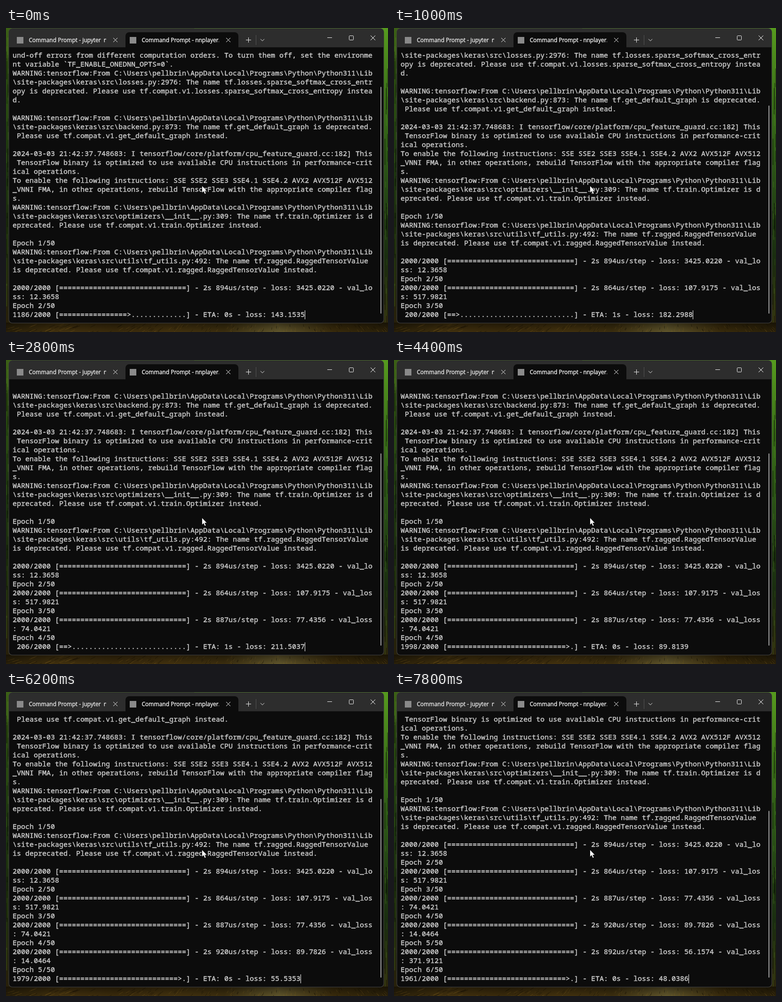
Recreate the animation shown at these times as an HTML page with a canvas. Size 812 by 646 pixels, loop 8000 ms.

```html
<!DOCTYPE html>
<html lang="en">
<head>
<meta charset="utf-8">
<title>Training log</title>
<style>
html, body { margin: 0; width: 100%; height: 100%; overflow: hidden; background: #0c0c0c; }
canvas { display: block; width: 812px; height: 646px; }
</style>
</head>
<body>
<canvas id="stage" width="812" height="646"></canvas>
<script>
const W = 812, H = 646, LOOP = 8000, TICK = 200;
const COLS = 85, ROWS = 30, CELL_W = 9, CELL_H = 19, LEFT = 14, BASE = 63;
const MONO = '15px "Noto Sans Mono", "DejaVu Sans Mono", monospace';
const UI = '12px "Open Sans", "Noto Sans", sans-serif';
const ctx = document.getElementById("stage").getContext("2d");

const SRC = String.raw`C:\Users\pellbrin\AppData\Local\Programs\Python\Python311\Lib\site-packages\keras\src`;
const warn = (file, name, instead) =>
  `WARNING:tensorflow:From ${SRC}\\${file}: The name ${name} is deprecated. Please use ${instead} instead.`;

const INTRO = [
  "und-off errors from different computation orders. To turn them off, set the environment variable `TF_ENABLE_ONEDNN_OPTS=0`.",
  warn("losses.py:2976", "tf.losses.sparse_softmax_cross_entropy", "tf.compat.v1.losses.sparse_softmax_cross_entropy"),
  "",
  warn("backend.py:873", "tf.get_default_graph", "tf.compat.v1.get_default_graph"),
  "",
  "2024-03-03 21:42:37.748683: I tensorflow/core/platform/cpu_feature_guard.cc:182] This TensorFlow binary is optimized to use available CPU instructions in performance-critical operations.",
  "To enable the following instructions: SSE SSE2 SSE3 SSE4.1 SSE4.2 AVX2 AVX512F AVX512_VNNI FMA, in other operations, rebuild TensorFlow with the appropriate compiler flags.",
  warn("optimizers\\__init__.py:309", "tf.train.Optimizer", "tf.compat.v1.train.Optimizer"),
  "",
  "Epoch 1/50",
  warn("utils\\tf_utils.py:492", "tf.ragged.RaggedTensorValue", "tf.compat.v1.ragged.RaggedTensorValue"),
  ""
];

// Finished epochs: microseconds per step, loss, validation loss
const DONE = [
  [894, "3425.0220", "12.3658"],
  [864, "107.9175", "517.9821"],
  [887, "77.4356", "74.0421"],
  [920, "89.7826", "14.0464"],
  [892, "56.1574", "371.9121"]
];

// Running loss per epoch, from the second on: step, loss, later step, loss
const LOSS = [
  [1186, 143.1535, 2000, 107.9175],
  [200, 182.2988, 1960, 77.9607],
  [206, 211.5037, 1998, 89.8139],
  [218, 88.2417, 1979, 55.5353],
  [227, 71.6052, 1961, 48.0386]
];

// Time and total steps since the first epoch ended
const PACE = [[0, 1186], [1000, 2200], [2600, 3960], [2800, 4206], [4400, 5998], [6200, 7979], [7800, 9961]];

function stepsAt(t) {
  let i = 1;
  while (i < PACE.length - 1 && t > PACE[i][0]) i++;
  const [t0, n0] = PACE[i - 1], [t1, n1] = PACE[i];
  return Math.round(n0 + (n1 - n0) * (t - t0) / (t1 - t0));
}

// A running mean settles like a + b / n
function lossAt(k, n) {
  const [n0, l0, n1, l1] = LOSS[k];
  const b = (l0 - l1) / (1 / n0 - 1 / n1);
  return (l1 + b * (1 / n - 1 / n1)).toFixed(4);
}

function bar(n) {
  const w = Math.floor(30 * n / 2000);
  const head = w ? "=".repeat(w - 1) + (n < 2000 ? ">" : "=") : "";
  return `${String(n).padStart(4)}/2000 [${head}${".".repeat(30 - w)}]`;
}

function wrap(line) {
  const rows = [];
  for (let i = 0; i === 0 || i < line.length; i += COLS) rows.push(line.slice(i, i + COLS));
  return rows;
}

function logAt(t) {
  const total = stepsAt(t), k = Math.floor(total / 2000), n = total % 2000;
  const lines = [...INTRO];
  for (let e = 0; e <= k; e++) {
    const [us, loss, val] = DONE[e];
    lines.push(`${bar(2000)} - 2s ${us}us/step - loss: ${loss} - val_loss: ${val}`, `Epoch ${e + 2}/50`);
  }
  const eta = Math.floor((2000 - n) * 0.0009);
  lines.push(`${bar(n)} - ETA: ${eta}s - loss: ${lossAt(k, n)}`);
  return lines.flatMap(wrap);
}

function rand(seed) {
  return () => (seed = (seed * 16807) % 2147483647) / 2147483647;
}

function gradient(x0, y0, x1, y1, colors) {
  const g = ctx.createLinearGradient(x0, y0, x1, y1);
  colors.forEach((c, i) => g.addColorStop(i / (colors.length - 1), c));
  return g;
}

function fill(color, x, y, w, h) {
  ctx.fillStyle = color;
  ctx.fillRect(x, y, w, h);
}

function box(color, x, y, w, h, r) {
  ctx.fillStyle = color;
  ctx.beginPath();
  ctx.roundRect(x, y, w, h, r);
  ctx.fill();
}

function stroke(color, ...paths) {
  ctx.strokeStyle = color;
  ctx.lineWidth = 1;
  ctx.beginPath();
  for (const [start, ...rest] of paths) {
    ctx.moveTo(...start);
    rest.forEach(p => ctx.lineTo(...p));
  }
  ctx.stroke();
}

function cross(x, y, r, color) {
  stroke(color, [[x - r, y - r], [x + r, y + r]], [[x - r, y + r], [x + r, y - r]]);
}

// Text with a thin outline, for slightly heavier stems
function write(text, x, y, font, color, weight) {
  ctx.font = font;
  ctx.fillStyle = ctx.strokeStyle = color;
  ctx.lineWidth = weight;
  ctx.lineJoin = "round";
  ctx.fillText(text, x, y);
  ctx.strokeText(text, x, y);
}

function drawForest() {
  const r = rand(71);
  fill(gradient(0, 0, 0, H, ["#3c6016", "#22400f", "#1d3410", "#1b260c", "#2a200a"]), 0, 0, 400, H);
  fill(gradient(0, 0, 0, H, ["#569a1e", "#3a7018", "#284e16", "#1a2e10", "#2e250c"]), 400, 0, 412, H);
  for (let i = 0; i < 60; i++) {
    const x = i % 2 ? r() * 6 : 803 + r() * 9;
    fill(r() < 0.55 ? "rgba(8,16,4,.4)" : "rgba(100,150,45,.2)", x, r() * 600, 1 + r() * 2, 10 + r() * 50);
  }
  fill(gradient(0, 0, W, 0, ["#2c220a", "#46340f", "#3c2c0c", "#46340f", "#3e300f", "#655a2e", "#3c2d0c", "#2c220a"]), 0, 626, W, 20);
  for (let i = 0; i < 170; i++) {
    const x = r() * W, y = 628 + r() * 18;
    const lean = (x - 590) / 40;
    stroke(r() < 0.5 ? "rgba(18,12,2,.5)" : "rgba(150,112,36,.35)", [[x, y], [x + lean, y + 5]]);
  }
  fill(gradient(0, 626, 0, H, ["rgba(0,0,0,.45)", "rgba(0,0,0,.05)"]), 0, 626, W, 20);
}

function drawTab(x, title, color) {
  box("#8a8a8a", x, 19, 14, 14, 0);
  ctx.save();
  ctx.beginPath();
  ctx.rect(x + 25, 12, 165, 26);
  ctx.clip();
  write(title, x + 25.5, 30, UI, color, 0.3);
  ctx.restore();
  cross(x + 209.5, 25.5, 4.5, color);
}

function drawWindow() {
  box("#444", 5.5, 0.5, 798, 627, 8);
  box("#0c0c0c", 6.5, 1.5, 796, 625, 7);
  box("#2d2d2d", 6.5, 1.5, 796, 39.5, [7, 7, 0, 0]);
  box("#0c0c0c", 254, 9, 240, 33, [8, 8, 0, 0]);
  drawTab(23, "Command Prompt - jupyter  notebook", "#f0f0f0");
  drawTab(263, "Command Prompt - nnplayer.", "#fff");
  stroke("#eee", [[510, 25.5], [521, 25.5]], [[515.5, 20], [515.5, 31]]);
  stroke("#555", [[531.5, 15], [531.5, 36]]);
  stroke("#eee", [[541, 23.5], [545, 27.5], [549, 23.5]], [[683, 20.5], [693, 20.5]]);
  ctx.beginPath();
  ctx.roundRect(729.5, 16.5, 9, 9, 1);
  ctx.stroke();
  cross(780, 21, 5, "#fff");
}

function drawPointer(x, y) {
  const shape = [[0, 0], [0, 15.5], [3.5, 12.3], [6, 18], [8.6, 16.8], [6.2, 11.3], [10.8, 11.3]];
  ctx.beginPath();
  shape.forEach(([dx, dy]) => ctx.lineTo(x + dx, y + dy));
  ctx.closePath();
  ctx.fillStyle = "#fff";
  ctx.fill();
  ctx.strokeStyle = "#000";
  ctx.lineWidth = 0.8;
  ctx.stroke();
}

function draw(t) {
  drawForest();
  drawWindow();
  const log = logAt(t), rows = log.slice(-ROWS);
  rows.forEach((row, i) => write(row, LEFT, BASE + i * CELL_H, MONO, "#ccc", 0.45));

  const blink = t % 1000;
  if (blink < 250 || blink >= 750) {
    fill("#fff", LEFT + rows[ROWS - 1].length * CELL_W, 600, 1, CELL_H);
  }
  const thumb = 482 * 33.4 / (33.4 + log.length - ROWS);
  box("#9b9b9b", 796, 607 - thumb, 2, thumb, 1);
  drawPointer(416.5, 335);
}

function frame(now) {
  draw(Math.floor((now % LOOP) / TICK) * TICK);
  requestAnimationFrame(frame);
}
requestAnimationFrame(frame);
</script>
</body>
</html>
```
